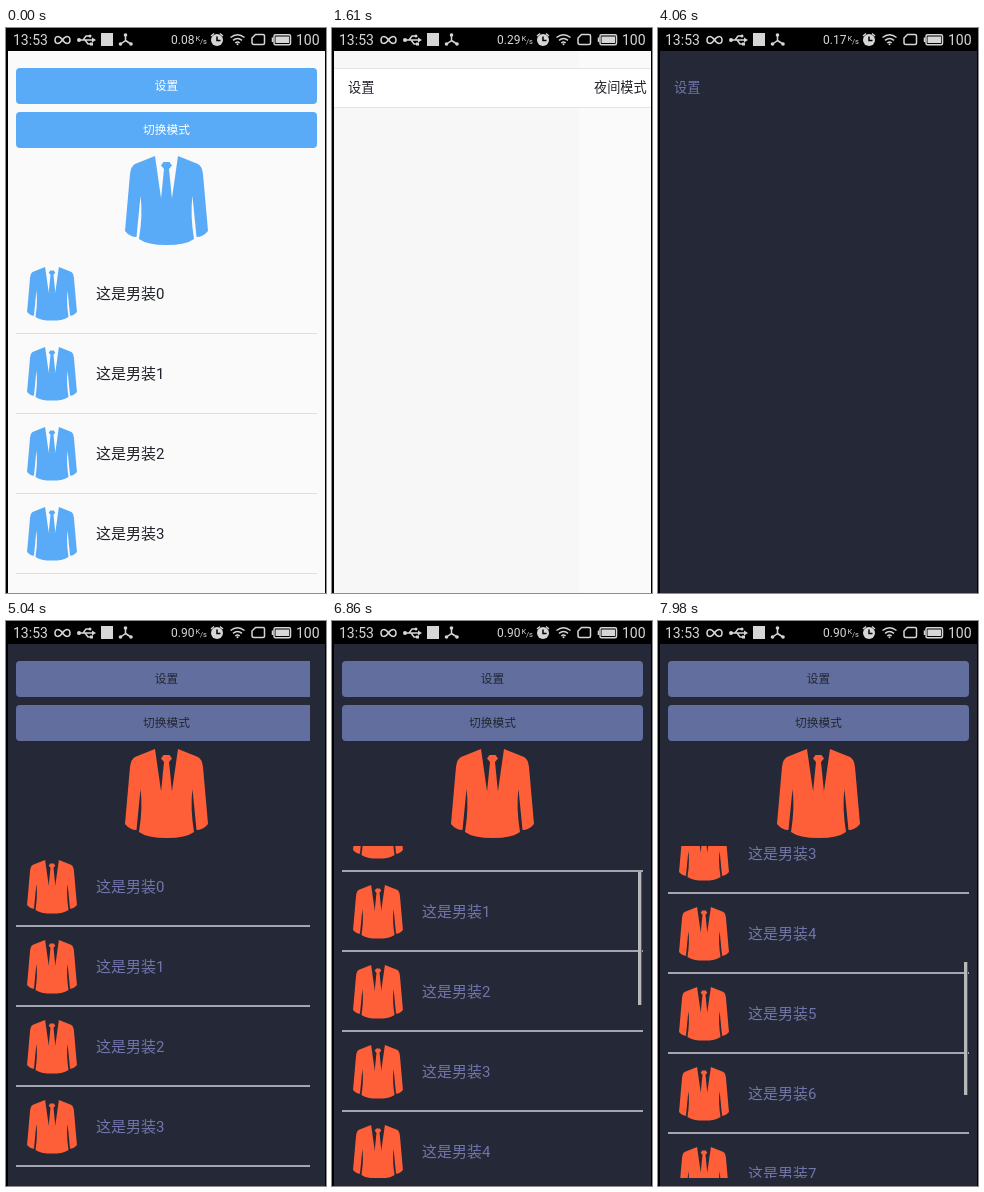
These frames come from a looping animation (320x565 px, 8000 ms). An HTML page:

```html
<!DOCTYPE html>
<html lang="zh">
<head>
<meta charset="utf-8">
<title>Theme switch</title>
<style>
html, body { margin: 0; width: 100%; height: 100%; overflow: hidden; background: #000; }
#stage {
  --bg: #fafafa; --under: #f7f7f7; --row: #fff; --edge: #e4e4e4; --ink: #20222b;
  --btn: #5aabf7; --btnInk: #fff; --suit: #5aabf7; --line: #dedede;
  position: relative; width: 320px; height: 565px; overflow: hidden; background: #000;
  font-family: Roboto, "Noto Sans CJK SC", "Noto Sans CJK", sans-serif;
}
#stage.dark {
  --bg: #252937; --under: #252937; --row: #252937; --edge: #252937; --ink: #7175ab;
  --btn: #626f9e; --btnInk: #222531; --suit: #ff5f38; --line: #a6a6b2;
}
#stage div { position: absolute; box-sizing: border-box; }
svg { position: absolute; overflow: visible; }
#view { left: 1px; top: 22px; width: 319px; height: 543px; overflow: hidden; clip-path: inset(1px 1px 0 1px); }
.page { left: 0; top: 0; width: 319px; height: 543px; background: var(--bg); }
#settings { background: var(--under); }
.btn {
  left: 9px; width: 301px; height: 36px; border-radius: 4px; overflow: hidden;
  background: var(--btn); color: var(--btnInk); font-size: 11.7px; line-height: 37px; text-align: center;
}
#ripple { left: 150px; top: 18px; width: 0; height: 0; border-radius: 50%; }
.suit { fill: var(--suit); }
#list { left: 9px; top: 203px; width: 301px; height: 332px; overflow: hidden; }
#rows { left: 0; top: 0; width: 301px; }
.item { left: 0; width: 301px; height: 80px; color: var(--ink); }
.item span { position: absolute; left: 80px; top: 29px; font-size: 15px; line-height: 22px; white-space: nowrap; }
.item .rule { left: 0; top: 79px; width: 301px; height: 1px; background: var(--line); }
.dark .item .rule { top: 78px; height: 2px; }
#bar { left: 305px; top: 206px; width: 4px; height: 133px; background: #b8b8ba; border-right: 1px solid #55565e; }
.row {
  left: 0; top: 18px; width: 319px; height: 40px; background: var(--row); color: var(--ink);
  border: solid var(--edge); border-width: 1px 0; padding-left: 15px; font-size: 13.2px; line-height: 38px;
}
#track { left: 262px; top: 29px; width: 39px; height: 18px; border-radius: 3px; background: #5aabf7; }
#thumb { left: 2px; top: 1px; width: 16px; height: 16px; border-radius: 3px; background: #fff; }
#track.dark { background: #606b9b; border: 1px solid #3d4365; }
#track.dark #thumb { left: 1px; top: 0; background: #282b3a; }
</style>
</head>
<body>
<div id="stage">
  <svg id="status" width="320" height="22" fill="none" stroke="#d6d6d6" stroke-width="1.5">
    <g fill="#d6d6d6" stroke="none">
      <text x="7" y="17" font-size="14">13:53</text>
      <text id="speed" x="165" y="16" font-size="12">0.08</text>
      <text x="189.500" y="12.500" font-size="7.500">K</text>
      <text x="194" y="16" font-size="7.500">/s</text>
      <text x="290" y="17" font-size="14">100</text>
    </g>
    <path d="M56.500 12C53 7 49 8 49 12S53 17 56.500 12S64 8 64 12S60 17 56.500 12"/>
    <path d="M73 12H88M77 12L80 8H83M79 12L82 16H85"/>
    <g fill="#d6d6d6" stroke="none">
      <circle cx="73" cy="12" r="2"/><path d="M86 9.500L90 12L86 14.500Z"/>
      <circle cx="84" cy="8" r="1.500"/><rect x="84" y="14.500" width="3" height="3"/>
      <rect x="95" y="5" width="12" height="13"/>
      <circle cx="119.500" cy="7" r="1.800"/><circle cx="114.500" cy="16" r="1.800"/><circle cx="125" cy="16" r="1.800"/>
      <circle cx="211" cy="12" r="6"/><circle cx="231.500" cy="16.300" r="1"/>
      <rect x="269.500" y="8.500" width="13.500" height="6.500"/>
    </g>
    <path d="M119.500 7V12.500L114.500 16M119.500 12.500L125 16"/>
    <path d="M205 8L208 5.500M217 8L214 5.500"/>
    <path d="M211 8.500V12.500H214.500" stroke="#000"/>
    <path d="M224.500 9.500Q231.500 4 238.500 9.500M227 12.300Q231.500 8.800 236 12.300M229.300 15Q231.500 13.200 233.700 15"/>
    <path d="M249.500 6.500H257Q258.500 6.500 258.500 8V15Q258.500 16.500 257 16.500H248Q246 16.500 246 14.500V10Z"/>
    <rect x="268" y="6.700" width="16.500" height="10" rx="1.500"/>
    <path d="M266.500 9.500V14"/>
  </svg>
  <div id="view">
    <div class="page" id="main">
      <div class="btn" style="top:18px"><div id="ripple"></div>设置</div>
      <div class="btn" style="top:62px">切换模式</div>
      <svg class="suit" style="left:118px;top:106px" width="83" height="89" viewBox="0 0 83 89">
        <g id="suit">
          <path d="M30 0L36 42H47L53 0L73 8Q77 10 78 18L83 75Q78 81 71.500 81L67.500 40Q65 58 69 83Q61 89 42 89Q22 89 14 83Q18 58 15.500 40L11.500 81Q5 81 0 75L5 18Q6 10 10 8Z"/>
          <path d="M38.500 6H44.500L47 9.500L44 13L47 43H36L39 13L36 9.500Z"/>
        </g>
      </svg>
      <div id="list"><div id="rows"></div></div>
      <div id="bar"></div>
    </div>
    <div class="page" id="settings"><div class="row">设置</div></div>
    <div class="page" id="night">
      <div class="row">夜间模式</div>
      <div id="track"><div id="thumb"></div></div>
    </div>
  </div>
</div>
<script>
const LOOP = 8000, STEP = 70, SLIDE = 880, WIDTH = 319;
const $ = id => document.getElementById(id);
const clamp = v => Math.max(0, Math.min(1, v));

// [time, value] tables
const scrollKeys = [[6440, 0], [6650, 15], [6860, 55], [7400, 180], [7980, 273]];
const barAlpha = [[5500, 1], [6230, 0], [6500, 0], [6510, 1]];
const thumbKeys = [[2870, 0], [3080, 19]];
const speeds = [[0, "0.08"], [420, "0.29"], [2450, "0.17"], [4200, "0.90"]];

function mix(keys, t) {
  if (t <= keys[0][0]) return keys[0][1];
  for (let i = 1; i < keys.length; i++) {
    const [a, x] = keys[i - 1], [b, y] = keys[i];
    if (t <= b) return x + (y - x) * (t - a) / (b - a);
  }
  return keys[keys.length - 1][1];
}

const decelerate = p => 1 - (1 - clamp(p)) ** 2;

// A page enters from the right and later leaves the same way.
function place(page, t, enter, leave, shown = enter) {
  const inside = decelerate((t - enter) / SLIDE);
  const gone = decelerate((t - leave) / SLIDE);
  const visible = t >= shown && gone < 1;
  page.style.visibility = visible ? "visible" : "hidden";
  page.style.transform = `translateX(${Math.round(WIDTH * (1 - inside + gone))}px)`;
}

for (let i = 0; i < 10; i++) {
  const item = document.createElement("div");
  item.className = "item";
  item.style.top = i * 80 + 1 + "px";
  item.innerHTML = `<svg class="suit" style="left:11px;top:13px" width="50" height="53.500" viewBox="0 0 83 89"><use href="#suit"/></svg>
    <span>这是男装${i}</span><div class="rule"></div>`;
  $("rows").append(item);
}

function draw(t) {
  const dark = t >= 2800;
  $("stage").className = dark ? "dark" : "";
  $("track").className = t >= 2730 ? "dark" : "";
  $("thumb").style.transform = `translateX(${mix(thumbKeys, t)}px)`;
  $("speed").textContent = speeds.filter(s => s[0] <= t).pop()[1];

  const press = t < 500 ? clamp(t / 350) : 0;
  $("ripple").style.boxShadow = press ? `0 0 0 ${press * 155}px rgba(0,0,0,.08)` : "none";

  place($("settings"), t, 380, 4357);
  place($("night"), t, 1502, 3167, 1610);

  const y = Math.round(mix(scrollKeys, t));
  $("rows").style.transform = `translateY(${-y}px)`;
  $("bar").style.transform = `translateY(${Math.round(y * .414)}px)`;
  $("bar").style.opacity = dark ? mix(barAlpha, t) : 0;
}

const start = performance.now();
function frame() {
  const t = (performance.now() - start) % LOOP;
  draw(Math.floor(t / STEP) * STEP);
  requestAnimationFrame(frame);
}
frame();
</script>
</body>
</html>
```
